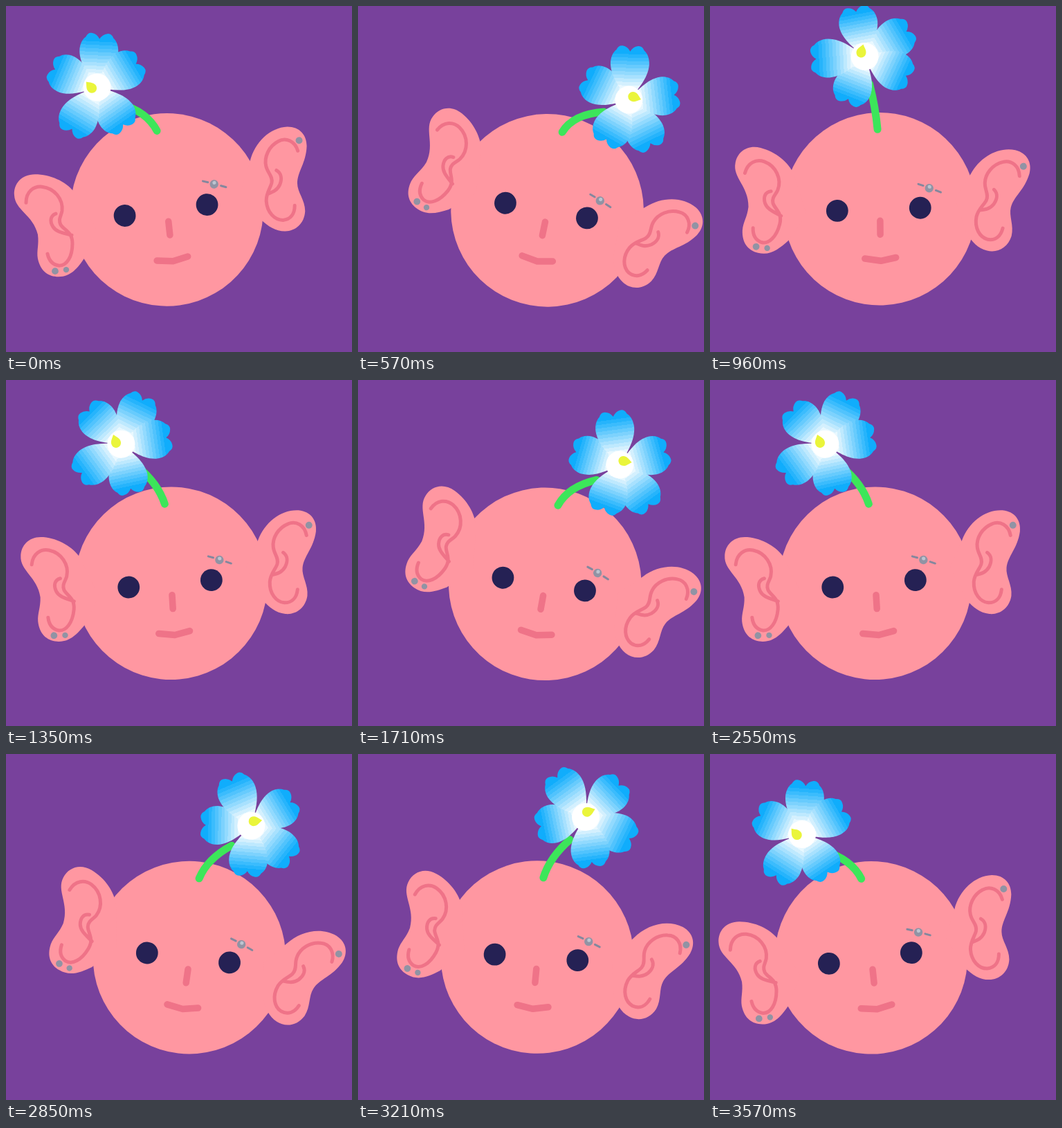
An HTML page that plays this animation: 500x500 px, repeating every 3600 ms.

```html
<!DOCTYPE html>
<html lang="en">
<head>
<meta charset="utf-8">
<title>Rocking head</title>
<style>
  html, body { margin: 0; width: 100%; height: 100%; overflow: hidden; background: #78419c; }
  svg { display: block; width: 100vw; height: 100vh; }
  .skin { fill: #ff97a1; }
  .line { fill: none; stroke: #ef7388; stroke-width: 5; stroke-linecap: round; stroke-linejoin: round; }
  .bold { stroke-width: 9.5; }
  .metal { fill: #9193a4; }
  .pin { stroke: #85879d; stroke-width: 3; stroke-linecap: round; }
</style>
</head>
<body>
<svg viewBox="0 0 500 500">
  <defs>
    <linearGradient id="blue" gradientUnits="userSpaceOnUse" x1="0" y1="0" x2="0" y2="-79"></linearGradient>
    <path id="petal" fill="url(#blue)" d="M0 2C-10 -14 -27 -30 -28 -52C-28 -61 -25 -68 -20 -72Q-17 -79 -11 -78Q-4 -77 0 -70Q4 -77 11 -78Q17 -79 20 -72C25 -68 28 -61 28 -52C27 -30 10 -14 0 2Z"/>
  </defs>
  <rect width="500" height="500" fill="#78419c"/>

  <g id="head">
    <circle class="skin" r="139.3"/>
    <circle cx="-61.5" cy=".5" r="15.9" fill="#252154"/>
    <circle cx="58.5" cy=".5" r="15.9" fill="#252154"/>
    <path class="line bold" d="M0 17L-.5 37M-24 71L-1 75L21 71"/>
    <path class="pin" d="M57 -34L64 -31.5M82 -24L89 -21"/>
    <circle class="metal" cx="72.5" cy="-27.5" r="6.2"/>
    <circle cx="73" cy="-29.5" r="2.6" fill="#bcc4d0"/>

    <g id="earL"><g transform="translate(-233.2 -301.6)">
      <path class="skin" d="M98 268C86 253 64 243 42 243C22 243 11 257 12 273C13 295 39 301 46 330C48 345 44 353 46 365C50 383 61 391 76 391C94 391 104 378 114 363L130 320Z"/>
      <path class="line" d="M29 284C29 268 40 260 52 261C70 263 83 279 81 296C80 303 75 308 79 316C84 324 96 326 96 343C96 362 88 375 77 375C67 374 62 367 60 358M72 300C64 303 63 311 68 319C73 327 84 328 95 331"/>
      <circle class="metal" cx="71" cy="383" r="4.9"/>
      <circle class="metal" cx="87" cy="381" r="4.2"/>
    </g></g>

    <g id="earR"><g transform="translate(-229.2 -283.8)">
      <path class="skin" d="M353 224C360 197 382 176 407 175C425 175 435 187 435 203C434 228 421 240 421 257C421 270 432 281 432 297C431 315 418 326 403 326C389 326 379 319 368 309L340 265Z"/>
      <path class="line" d="M422 210C418 196 405 190 394 196C380 203 373 219 376 232C378 242 386 246 384 256C382 264 376 270 376 282C377 299 388 310 400 310C411 309 417 301 417 289M391 238C398 242 399 250 396 258C392 267 386 269 378 272"/>
      <circle class="metal" cx="424" cy="195" r="5"/>
    </g></g>
  </g>

  <g id="sprout">
    <path id="stem" fill="none" stroke="#3ce65a" stroke-width="11" stroke-linecap="round"/>
    <g id="flower">
      <g id="petals"></g>
      <circle r="20" fill="#fff"/>
      <path fill="#eaf53b" transform="translate(-8 .5) rotate(-42)" d="M0 -11.5C4 -6 7 -4 7 1A7 7 0 1 1 -7 1C-7 -4 -4 -6 0 -11.5Z"/>
    </g>
  </g>
</svg>
<script>
const $ = id => document.getElementById(id);
const PERIOD = 1200, STEP = 30, BANDS = 11;
const lerp = (a, b, u) => a + (b - a) * u;
const smooth = u => u * u * (3 - 2 * u);

// 0 to 1 and back; drag keeps the part a little longer on its first side
function swing(t, peak, drag = 0) {
  const h = smooth(t < peak ? t / peak : (PERIOD - t) / (PERIOD - peak));
  return h - drag * h * h * (1 - h);
}

// Point at a distance, with the angle measured clockwise from straight up
function polar(r, deg) {
  const a = deg * Math.PI / 180;
  return [r * Math.sin(a), -r * Math.cos(a)];
}

const move = (id, value) => $(id).setAttribute('transform', value);

function draw(t) {
  const roll = swing(t, 600, .55);
  const x = lerp(232.5, 274, roll), tilt = lerp(-7.6, 10.6, roll);
  const y = 293.2 + .02 * tilt * tilt;
  move('head', `translate(${x} ${y}) rotate(${tilt})`);
  move('earL', `rotate(${lerp(7.6, 29.2, swing(t, 650))} -56 1.3)`);
  move('earR', `rotate(${lerp(7.2, 33.4, swing(t, 630, .45))} 80.7 -19.4)`);

  const sway = swing(t, 615), lean = lerp(-54, 66, sway);
  const [bx, by] = polar(115, tilt);
  move('sprout', `translate(${x + bx + .8} ${y + by})`);
  move('flower', `translate(${polar(107, lean)}) rotate(${153 * sway})`);
  $('stem').setAttribute('d', `M0 0Q${polar(31, lean / 2)} ${polar(67, lean)}`);
}

// Flat bands from white to blue
for (let i = 0; i <= BANDS; i++) {
  const mix = (c) => Math.round(lerp(255, c, i / BANDS));
  const edge = k => lerp(.2, .9, k / BANDS);
  for (const offset of [i ? edge(i - 1) : 0, i < BANDS ? edge(i) : 1]) {
    $('blue').innerHTML += `<stop offset="${offset}" stop-color="rgb(${mix(16)},${mix(173)},${mix(252)})"/>`;
  }
}

// Petal angle and length
$('petals').innerHTML = [[3, 79], [59, 74], [145, 74], [211, 79], [293, 74]]
  .map(([a, r]) => `<use href="#petal" transform="rotate(${a}) scale(1 ${r / 79})"/>`).join('');

const start = performance.now();
function tick() {
  const t = Math.max(0, performance.now() - start);
  draw(Math.floor(t / STEP) * STEP % PERIOD);
  requestAnimationFrame(tick);
}
tick();
</script>
</body>
</html>
```
